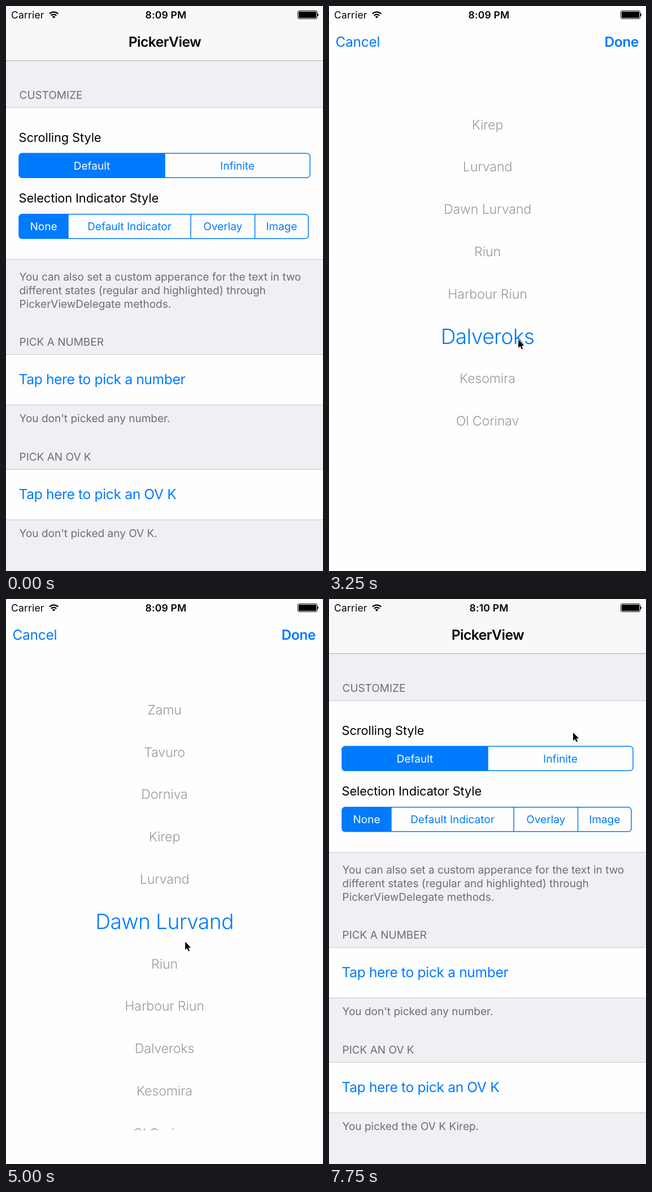
An HTML page that plays this animation: 561x998 px, repeating every 8 s.

```html
<!DOCTYPE html>
<html lang="en">
<head>
<meta charset="utf-8">
<title>PickerView</title>
<style>
  html, body { margin: 0; width: 100%; height: 100%; overflow: hidden; background: #efeff4; }
  svg { display: block; width: 561px; height: 998px; }
  text {
    font-family: Inter, Roboto, sans-serif;
    font-optical-sizing: none;
    text-rendering: geometricPrecision;
    white-space: pre;
  }
  .status { font-size: 17.5px; letter-spacing: .2px; }
  .bold { font-weight: 600; }
  .note { font-size: 19px; fill: #6d6d72; }
  .label { font-size: 21.8px; letter-spacing: -.1px; }
  .seg { font-size: 19px; fill: #007aff; text-anchor: middle; }
  .on { fill: #fff; }
  .body { font-size: 24.6px; letter-spacing: -.36px; }
  .title { font-size: 24.6px; letter-spacing: -.5px; font-weight: 600; }
  .blue { fill: #007aff; }
  .mid { text-anchor: middle; }
  .end { text-anchor: end; }
  .row { font-size: 23.2px; font-weight: 300; letter-spacing: -.15px; fill: #999; text-anchor: middle; }
  .row.picked { font-size: 37.2px; letter-spacing: -.6px; fill: #007aff; }
</style>
</head>
<body>
<svg id="stage" viewBox="0 0 561 998"></svg>
<script>
const LOOP = 8000, STEP = 250;
const W = 561, H = 998, ROW = 74.8, MIDDLE = 547;
const BLUE = '#007aff', WHITE = '#fefefe', LINE = '#c8c7cc';
const SYSTEM = 'OV K';
const versions = ['Brunvah', 'Zamu', 'Tavuro', 'Dorniva', 'Kirep', 'Lurvand', 'Dawn Lurvand',
  'Riun', 'Harbour Riun', 'Dalveroks', 'Kesomira', 'Ol Corinav'];

// ---- Motion ----

// Smooth step from 0 to 1 between two times
function ramp(t, from, to) {
  const u = Math.min(1, Math.max(0, (t - from) / (to - from)));
  return u * u * (3 - 2 * u);
}

// Flick to the last row, fling back, then settle on the fifth
const pickAt = t =>
  6 + 5.03 * ramp(t, 2750, 3750) - 4.8 * ramp(t, 3750, 4500) - 2.23 * ramp(t, 4500, 6080);

const sheetAt = t => H * (1 - ramp(t, 1900, 2240) + ramp(t, 6600, 7000));

// Places where the hand stops
const stops = [
  { at: 500, x: 550, y: 511 },
  { at: 1500, x: 355, y: 829 },
  { at: 2000, x: 355, y: 856 },
  { at: 2500, x: 352, y: 819 },
  { at: 3750, x: 326, y: 465 },
  { at: 4500, x: 322, y: 614 },
  { at: 5750, x: 308, y: 590 },
  { at: 6500, x: 515, y: 66 },
  { at: 7750, x: 432, y: 236 }
];

function pointerAt(t) {
  let { x, y } = stops[0];
  for (let i = 1; i < stops.length; i++) {
    const a = stops[i - 1], b = stops[i], f = ramp(t, a.at, b.at);
    x += (b.x - a.x) * f;
    y += (b.y - a.y) * f;
  }
  return { x, y };
}

// ---- Shapes ----

const text = (x, y, cls, str, id = '') =>
  `<text x="${x}" y="${y}" class="${cls}" id="${id}">${str}</text>`;
const rect = (x, y, w, h, fill, extra = '') =>
  `<rect x="${x}" y="${y}" width="${w}" height="${h}" fill="${fill}" ${extra}/>`;
const cell = (y, h) =>
  rect(0, y, W, h, WHITE) + rect(0, y - .5, W, 1, LINE) + rect(0, y + h - .5, W, 1, LINE);

function segments(y, edges, names) {
  const left = edges[0], right = edges[edges.length - 1];
  let out = rect(left, y, right - left, 43, WHITE, `rx="5.5" stroke="${BLUE}" stroke-width="1.5"`);
  out += `<path fill="${BLUE}" d="M${edges[1]} ${y}H${left + 5.5}q-5.5 0-5.5 5.5v32q0 5.5 5.5 5.5H${edges[1]}z"/>`;
  names.forEach((name, i) => {
    if (i > 0) out += rect(edges[i] - .75, y, 1.5, 43, BLUE);
    out += text((edges[i] + edges[i + 1]) / 2, y + 28.3, i ? 'seg' : 'seg on', name);
  });
  return out;
}

const section = (y, name, id) =>
  text(23.5, y, 'note', 'PICK ' + name.toUpperCase()) +
  cell(y + 15.5, 89) +
  text(22.5, y + 68, 'body blue', 'Tap here to pick ' + name) +
  text(23.5, y + 135, 'note', "You don't picked any number.", id);

function arc(r) {
  const d = r * Math.SQRT1_2;
  return `<path d="M${84.5 - d} ${21.5 - d}A${r} ${r} 0 0 1 ${84.5 + d} ${21.5 - d}" fill="none" stroke="#000" stroke-width="2.3"/>`;
}

const about = [
  'You can also set a custom apperance for the text in two',
  'different states (regular and highlighted) through',
  'PickerViewDelegate methods.'
];

const form =
  rect(0, 0, W, H, '#efeff4') +
  rect(0, 0, W, 96, '#f8f8f9') + rect(0, 96, W, 1, '#acacb0') +
  text(281, 72, 'title mid', 'PickerView') +
  text(23.5, 164, 'note', 'CUSTOMIZE') +
  cell(179.5, 268) +
  text(22.5, 240, 'label', 'Scrolling Style') +
  segments(260.3, [23, 281, 538], ['Default', 'Infinite']) +
  text(22.5, 346.5, 'label', 'Selection Indicator Style') +
  segments(367.8, [23, 110, 327, 440.5, 535], ['None', 'Default Indicator', 'Overlay', 'Image']) +
  about.map((line, i) => text(23.5, 484.5 + 24 * i, 'note', line)).join('') +
  section(600, 'a number') +
  section(803, 'an ' + SYSTEM, 'result');

const sheet =
  `<g id="sheet">${rect(0, 0, W, H, WHITE)}` +
  text(11.5, 72, 'body blue', 'Cancel') +
  text(547.8, 72, 'title blue end', 'Done') +
  `<g clip-path="url(#window)">${versions.map(v => text(280.5, 0, 'row', v)).join('')}</g></g>`;

const statusBar =
  text(9, 21.8, 'status', 'Carrier') +
  '<path d="M84.5 21.8l-2.8-2.8a4 4 0 0 1 5.6 0z"/>' + arc(6.6) + arc(10.9) +
  text(283, 21.8, 'status bold mid', '', 'clock') +
  rect(516.5, 8.5, 34, 14, 'none', 'rx="2" stroke="#000"') +
  rect(518, 10, 31, 11, '#000', 'rx=".5"') +
  '<path d="M551 13q2 .5 2 2.5t-2 2.5z"/>';

const pointer =
  '<path id="pointer" d="M0 0V14.2L3.3 11.2 5.7 16.6 8 15.6 5.7 10.3H10.2z" stroke="#fff" stroke-width="1.6" paint-order="stroke"/>';

const stage = document.getElementById('stage');
stage.innerHTML =
  `<defs><clipPath id="window">${rect(0, 155.5, W, 783, '#000')}</clipPath></defs>` +
  form + sheet + statusBar + pointer;

const [sheetEl, clockEl, resultEl, pointerEl] =
  ['sheet', 'clock', 'result', 'pointer'].map(id => document.getElementById(id));
const rows = [...stage.querySelectorAll('.row')];

function draw(t) {
  const pick = pickAt(t), picked = Math.round(pick);
  const { x, y } = pointerAt(t);

  sheetEl.setAttribute('transform', `translate(0 ${sheetAt(t)})`);
  rows.forEach((row, i) => {
    const on = i === picked;
    row.classList.toggle('picked', on);
    row.setAttribute('y', MIDDLE + ROW * (i - pick) + (on ? 14 : 8.4));
  });
  clockEl.textContent = t < 5500 ? '8:09 PM' : '8:10 PM';
  resultEl.textContent = t < 6500
    ? `You don't picked any ${SYSTEM}.`
    : `You picked the ${SYSTEM} ${versions[picked]}.`;
  pointerEl.setAttribute('transform', `translate(${x} ${y})`);
  pointerEl.setAttribute('visibility', t < stops[0].at ? 'hidden' : 'visible');
}

// The screen refreshes four times a second
const start = performance.now();
function tick() {
  const t = (performance.now() - start) % LOOP;
  draw(Math.floor(t / STEP) * STEP);
  requestAnimationFrame(tick);
}
tick();
</script>
</body>
</html>
```
